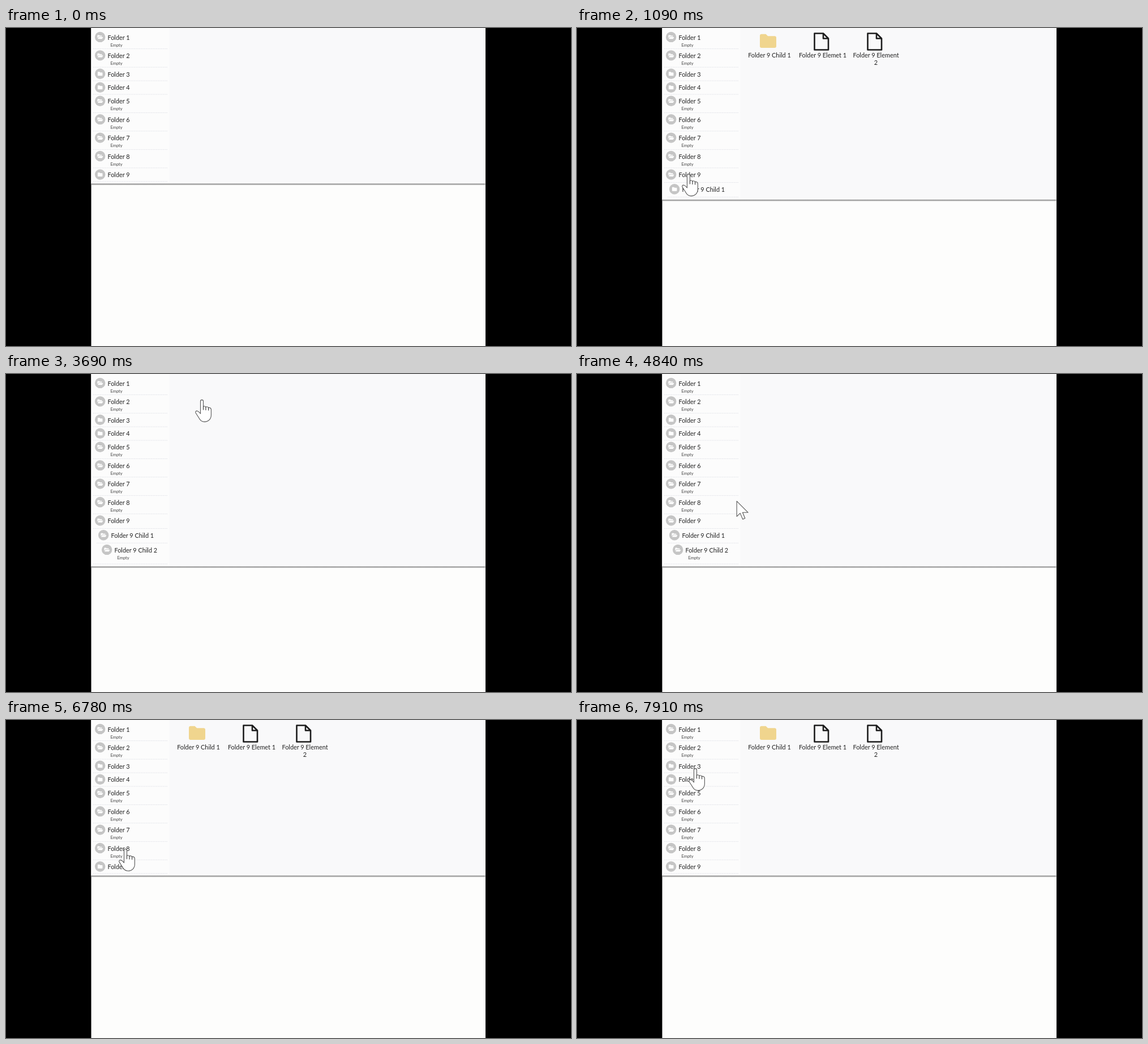
An HTML page for the animation above (8 s loop, 998 by 561 pixels).

```html
<!DOCTYPE html>
<html lang="en">
<head>
<meta charset="utf-8">
<title>Folder browser</title>
<style>
  html, body { margin: 0; width: 100%; height: 100%; overflow: hidden; background: #000; }
  svg { display: block; width: 998px; height: 561px; }
  text { font: 10.9px Lato, "Open Sans", sans-serif; fill: #222; }
  .note { font-size: 7.5px; fill: #444; }
  .hint { font-size: 9px; fill: #333; }
  .mid { text-anchor: middle; }
  .line { stroke: #e4e5ea; stroke-width: 1; stroke-dasharray: 2 1; }
  .file { fill: none; stroke: #1c1c1c; stroke-width: 2.6; stroke-linejoin: round; }
  .cursor { fill: #fff; stroke: #555; stroke-width: 1.1; stroke-linejoin: round; stroke-linecap: round; }
</style>
</head>
<body>
<svg viewBox="0 0 998 561">
  <defs>
    <linearGradient id="shade" x1="0" y1="0" x2="0" y2="1">
      <stop offset="0" stop-color="#888"/>
      <stop offset=".35" stop-color="#999"/>
      <stop offset="1" stop-color="#999" stop-opacity="0"/>
    </linearGradient>
    <g id="closed">
      <circle r="9.2" fill="#c5c5c5"/>
      <path d="M-4.3-2.6q0-.9.9-.9h2.5l1.1 1.1h3.2q.9 0 .9.9v4.1q0 .9-.9.9h-6.8q-.9 0-.9-.9z" fill="#fff"/>
    </g>
    <g id="open">
      <circle r="9.2" fill="#c5c5c5"/>
      <path d="M-4.8 2V-2.6q0-.9.9-.9h2.4l1.1 1.1h2.9q.9 0 .9.9v.8H-2q-.8 0-1.2.7zM-4.3 3.3l1.6-2.8q.3-.5.9-.5H4.8q.6 0 .3.6L3.8 2.9q-.3.5-.9.5z" fill="#fff"/>
    </g>
    <path id="folder" d="M0 3.2Q0 .2 3 .2H10.5L14.2 3.8H26Q29 3.8 29 6.8V21.5Q29 24.5 26 24.5H3Q0 24.5 0 21.5z" fill="#f0d58e"/>
    <path id="file" class="file" d="M1.5 1.5H17L26 10.5V30.5H1.5zM17 1.5V10.5H26"/>
  </defs>
  <rect x="150.5" width="696.5" height="561" fill="#fdfdfc"/>
  <g id="panel"></g>
  <g id="cursor" class="cursor">
    <path id="arrow" d="M0 0V27L6 21.3 10.6 32 14.6 30.2 10.3 20H20z"/>
    <g id="hand" transform="translate(-11 -1)">
      <path d="M9.5 3.2Q9.5 .6 12 .6T14.5 3.2V12.5Q16.8 10.8 18.9 13.2 21.6 11.8 23.6 14.4 27.6 13.6 28.4 17.5V27C28.4 35 23 39.4 16.5 39.4 11 39.4 8.6 36 6 31.3L1 23.5Q.2 19.8 3.8 20.2 6 20.6 9.5 25z"/>
      <path d="M14.5 12V18M18.9 13.2V18.5M23.6 14.4V19" stroke="#333"/>
    </g>
  </g>
</svg>
<script>
const LOOP = 8000;
const $ = id => document.getElementById(id);

const child1 = { name: 'Folder 9 Child 1', depth: 1 };
const child2 = { name: 'Folder 9 Child 2', depth: 2, empty: true, height: 36.8 };
const listA = [['folder', 'Folder 9 Child 1'], ['file', 'Folder 9 Elemet 1'], ['file', 'Folder 9 Element', '2']];
const listB = [['folder', 'Folder 9 Child 2', 'Empty'], ['file', 'Folder 9 Child 1', 'Elemet 1'], ['file', 'Folder 9 Child 1', 'Element 2']];
const deepTree = [{ ...child1, open: true }, child2];

const views = [
  { start: 0, bottom: 274.5, children: [], items: [] },
  { start: 930, bottom: 302.8, children: [child1], items: listA },
  { start: 2370, bottom: 339.5, children: deepTree, items: listB },
  { start: 3690, bottom: 339.5, children: deepTree, items: [] },
  { start: 5760, bottom: 274.5, children: [], items: listA }
];

// time, x, y of the pointer tip
const track = [
  [60, 820, 518], [860, 196, 258], [1400, 196, 258], [2180, 345, 46],
  [4400, 345, 46], [4580, 345, 92], [4840, 282.5, 224], [5030, 226, 280], [5200, 198, 256],
  [6450, 198, 256], [6690, 200, 251], [6780, 210, 228], [7100, 213, 200], [7520, 211, 160], [7910, 208, 86]
];
const easedStarts = [60, 1400];

function treeRow(row, top) {
  const shift = 6 * row.depth;
  const icon = row.open || row.empty ? 'open' : 'closed';
  return `<use href="#${icon}" x="${166.2 + shift}" y="${top + 11.7}"/>
    <text x="${179.5 + shift}" y="${top + 16.4}">${row.name}</text>` +
    (row.empty ? `<text class="note" x="${184.5 + shift}" y="${top + 28.4}">Empty</text>` : '');
}

function gridItem([kind, label, second], i) {
  const center = 340 + 94 * i;
  const [x, y] = kind === 'folder' ? [323, 10.5] : [center - 16, 8];
  return `<use href="#${kind}" x="${x}" y="${y}"/>
    <text class="mid" x="${center}" y="52.4">${label}</text>` +
    (second ? `<text class="mid ${second === 'Empty' ? 'hint' : ''}" x="${center}" y="65.4">${second}</text>` : '');
}

function drawView({ bottom, children, items }) {
  const rows = Array.from({ length: 9 }, (_, i) => ({
    name: `Folder ${i + 1}`, depth: 0,
    empty: ![3, 4, 9].includes(i + 1),
    open: i === 8 && children.length > 0
  })).concat(children);
  let top = 4.2;
  const tree = rows.map(row => {
    const content = treeRow(row, top);
    top += row.height || (row.empty ? 32.45 : row.open || row.depth ? 25.7 : 23.95);
    const left = row.depth === 1 ? 160 : 154;
    return `${content}<path class="line" d="M${left} ${top}H285"/>`;
  }).join('');
  $('panel').innerHTML = `
    <rect x="150.5" width="696" height="${bottom}" fill="#f9f9fa"/>
    <rect x="150.5" width="138" height="${bottom}" fill="#fcfcfc"/>
    <rect x="150.5" y="${bottom}" width="696" height="3.2" fill="url(#shade)"/>
    ${tree}${items.map(gridItem).join('')}`;
}

function pointerAt(t) {
  const next = track.findIndex(key => key[0] > t);
  if (next < 0) return track.at(-1).slice(1);
  const [t0, x0, y0] = track[next - 1], [t1, x1, y1] = track[next];
  let k = (t - t0) / (t1 - t0);
  if (easedStarts.includes(t0)) k = k * k * (3 - 2 * k);
  return [x0 + (x1 - x0) * k, y0 + (y1 - y0) * k];
}

function drawPointer(t, view) {
  const visible = t >= track[0][0];
  $('cursor').style.display = visible ? '' : 'none';
  if (!visible) return;
  const [x, y] = pointerAt(t);
  const overTree = x < 270 && y < view.bottom;
  const overFolder = x > 303 && x < 377 && y < 68 && t < 4400;
  const pointing = overTree || overFolder;
  $('hand').style.display = pointing ? '' : 'none';
  $('arrow').style.display = pointing ? 'none' : '';
  $('cursor').setAttribute('transform', `translate(${x} ${y})`);
}

let shown;
const began = performance.now();
function frame() {
  const t = (performance.now() - began) % LOOP;
  const view = views.findLast(v => v.start <= t);
  if (view !== shown) drawView(shown = view);
  drawPointer(t, view);
  requestAnimationFrame(frame);
}
frame();
</script>
</body>
</html>
```
